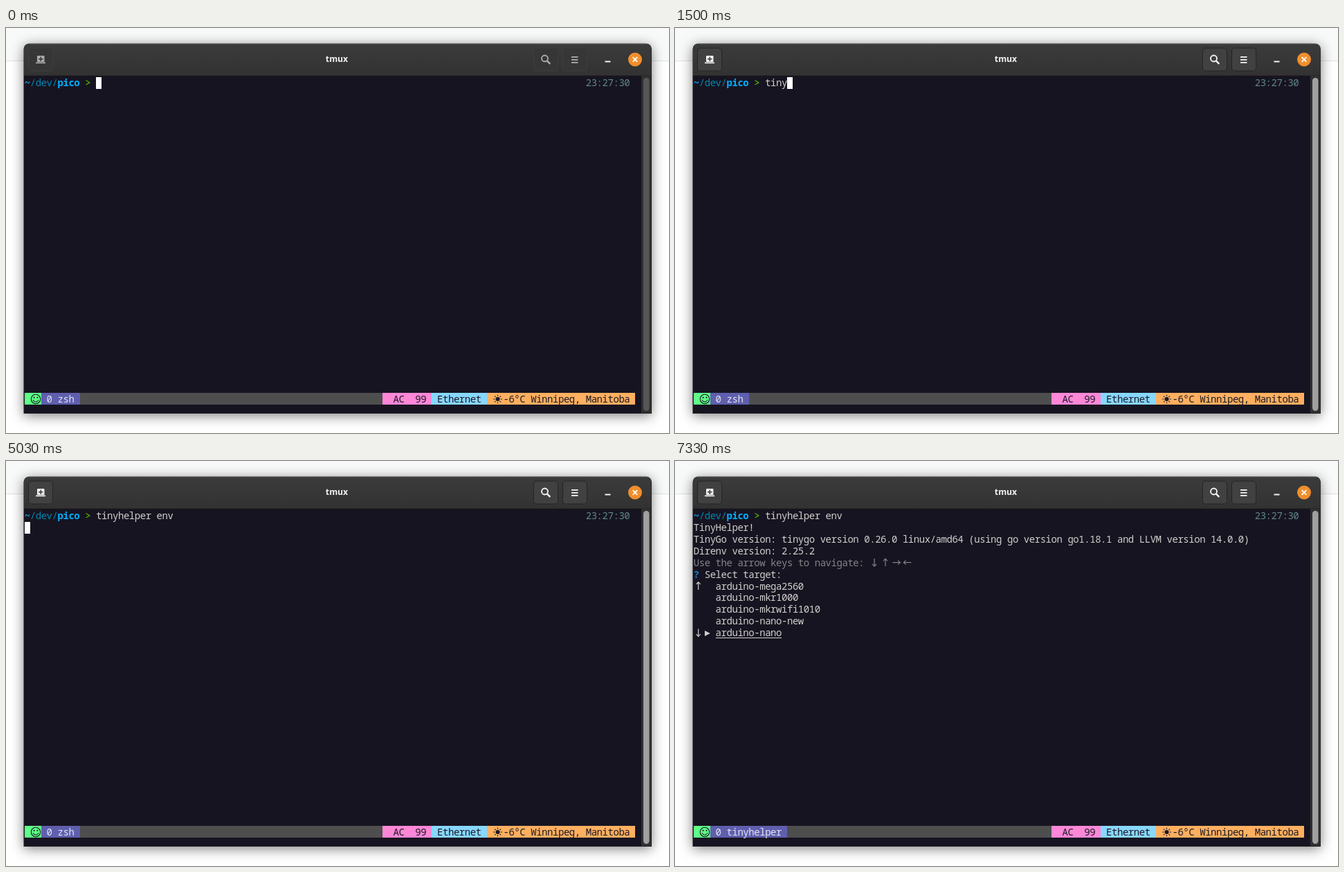
Animation, 958 px wide and 585 px high, one loop 8 s. Source, as an HTML page with a canvas:

```html
<!DOCTYPE html>
<html lang="en">
<head>
<meta charset="utf-8">
<title>Terminal</title>
<style>
  html, body { margin: 0; width: 100%; height: 100%; overflow: hidden; background: #fff; }
  canvas { display: block; width: 958px; height: 585px; }
</style>
</head>
<body>
<canvas id="stage" width="958" height="585"></canvas>
<script>
const ctx = document.getElementById('stage').getContext('2d');
const LOOP = 8000, CELL = 7.95, ROW = 16.9, LEFT = 27, TOP = 71;
const FG = '#d0cfcc', DARK = '#1c1926', DIM = '#858388';

const COMMAND = 'tinyhelper env';
// [time, characters typed], [time, selected item], times of the focus fade
const TYPING = [[0, 0], [1070, 1], [1170, 2], [1230, 3], [1500, 4], [1900, 5],
                [2300, 11], [2870, 12], [3870, 13], [4170, 14]];
const SELECTION = [[0, 0], [6170, 1], [6770, 2], [6970, 3], [7130, 4], [7330, 5]];
const FOCUS = [[0, 0], [30, 1 / 3], [100, 2 / 3], [170, 1]];
const ENTER = 5030, OUTPUT = 5070, MENU = 5100;
const TARGETS = ['mega1280', 'mega2560', 'mkr1000', 'mkrwifi1010', 'nano-new', 'nano']
  .map(name => 'arduino-' + name);

const stepAt = (steps, t) => steps.filter(s => s[0] <= t).pop()[1];
const colX = col => LEFT + col * CELL;
const rowY = row => TOP + row * ROW;

function rect(x, y, w, h, color) {
  ctx.fillStyle = color;
  ctx.fillRect(x, y, w, h);
}

function round(x, y, w, h, r, color) {
  ctx.fillStyle = color;
  ctx.beginPath();
  ctx.roundRect(x, y, w, h, r);
  ctx.fill();
}

function line(points, color, width) {
  ctx.strokeStyle = color;
  ctx.lineWidth = width;
  ctx.beginPath();
  points.forEach(([x, y], i) => i ? ctx.lineTo(x, y) : ctx.moveTo(x, y));
  ctx.stroke();
}

function circle(x, y, r, color, strokeWidth) {
  ctx.beginPath();
  ctx.arc(x, y, r, 0, 2 * Math.PI);
  ctx.fillStyle = ctx.strokeStyle = color;
  ctx.lineWidth = strokeWidth || 1;
  strokeWidth ? ctx.stroke() : ctx.fill();
}

// Text sits on the terminal's character grid
function print(col, row, text, color = FG, weight = 400) {
  ctx.font = `${weight} 14px "Noto Sans Mono", "DejaVu Sans Mono", monospace`;
  ctx.fillStyle = color;
  ctx.textAlign = 'center';
  [...text].forEach((ch, i) => ctx.fillText(ch, colX(col + i + 0.5), Math.round(rowY(row) + 13.2)));
}

function cells(col, count, row, color) {
  const x = Math.round(colX(col)), y = Math.round(rowY(row));
  rect(x, y, Math.round(colX(col + count)) - x, 17, color);
}

function arrow(col, row, quarterTurns, color) {
  ctx.save();
  ctx.translate(colX(col) + 6.7, rowY(row) + 8);
  ctx.rotate(quarterTurns * Math.PI / 2);
  line([[-5.5, 0], [5.5, 0]], color, 1.2);
  line([[2.2, -3], [5.4, 0], [2.2, 3]], color, 1.2);
  ctx.restore();
}

function drawBackdrop() {
  rect(0, 0, 958, 585, '#fff');
  rect(0, 0, 958, 47, '#f8f9f9');
  rect(0, 47, 958, 1, '#dfe0e1');
  ctx.save();
  ctx.shadowColor = 'rgba(0,0,0,.5)';
  ctx.shadowBlur = 18;
  ctx.shadowOffsetY = 3;
  round(25.5, 22.5, 907.5, 534.5, [8, 8, 0, 0], '#242328');
  ctx.restore();
}

function drawButton(x, focus) {
  const mix = (a, b) => Math.round(a + (b - a) * focus);
  const border = mix(62, 37), fill = mix(54, 65);
  round(x, 28.5, 36, 34, 5, `rgb(${border},${border},${border})`);
  round(x + 1, 29.5, 34, 32, 4, `rgb(${fill},${fill},${fill})`);
}

function drawHeader(focus) {
  const fill = ctx.createLinearGradient(0, 23, 0, 69);
  fill.addColorStop(0, '#3b3b3b');
  fill.addColorStop(1, '#323232');
  round(26, 23, 906.5, 46, [7, 7, 0, 0], fill);
  rect(33, 23, 893, 1, '#484848');
  rect(26, 68, 906.5, 1, '#292929');
  [32, 762, 804].forEach(x => drawButton(x, focus));

  const level = Math.round(172 + 70 * focus), icon = `rgb(${level},${level},${level})`;
  const face = focus > 0.5 ? '#414141' : '#363636';
  round(45, 40, 10.5, 9, 1, icon);
  rect(43, 49.5, 14, 1.7, icon);
  rect(47, 44, 6.5, 1.6, face);
  rect(49.5, 41.6, 1.6, 6.4, face);
  circle(778.5, 44, 4.5, icon, 1.9);
  line([[781.8, 47.3], [786.3, 51.8]], icon, 2.4);
  [41, 45, 49].forEach(y => rect(817, y, 9.5, 1.8, icon));

  rect(865.5, 47.5, 8, 2, '#f2f2f2');
  circle(909, 45.5, 10, '#f18e2e');
  line([[905.7, 42.2], [912.3, 48.8]], '#fff', 1.9);
  line([[912.3, 42.2], [905.7, 48.8]], '#fff', 1.9);

  ctx.font = '700 12.2px "Open Sans", "Noto Sans", sans-serif';
  ctx.textAlign = 'center';
  ctx.fillStyle = '#f4f4f4';
  ctx.fillText('tmux', 478, 49);
}

function drawScrollbar(focus) {
  const level = Math.round(86 + 74 * focus);
  rect(918, 69, 14, 487, '#303030');
  round(921, 72, 8.5, 481, 4.2, `rgb(${level},${level},${level})`);
}

function drawStatus(program) {
  const row = 27, y = rowY(row) + 8.7;
  cells(0, 111, row, '#4e4e4e');
  cells(0, 3, row, '#5fff87');
  cells(3, program.length + 4, row, '#5f5faf');
  cells(65, 9, row, '#ff87d7');
  cells(74, 10, row, '#87d7ff');
  cells(84, 27, row, '#ffaf5f');
  print(4, row, '0 ' + program, '#e4e4ee');
  print(67, row, 'AC  99', DARK);
  print(75, row, 'Ethernet', DARK);
  print(87, row, '-6°C Winnipeg, Manitoba', DARK);

  circle(43, y, 6.7, DARK, 1.1);
  circle(40.6, y - 2.2, 1.1, DARK);
  circle(45.4, y - 2.2, 1.1, DARK);
  ctx.lineWidth = 1.1;
  ctx.beginPath();
  ctx.arc(43, y, 4, 0.3, Math.PI - 0.3);
  ctx.stroke();

  circle(710.5, y, 3, DARK);
  for (let a = 0; a < 8; a++) {
    const dx = Math.cos(a * Math.PI / 4), dy = Math.sin(a * Math.PI / 4);
    line([[710.5 + 4.2 * dx, y + 4.2 * dy], [710.5 + 6.3 * dx, y + 6.3 * dy]], DARK, 1.1);
  }
}

function drawMenu(selected) {
  print(0, 4, 'Use the arrow keys to navigate:', DIM);
  [1, 3, 0, 2].forEach((turn, i) => arrow(32 + 2 * i, 4, turn, DIM));
  print(0, 5, '?', '#1680d0', 700);
  print(2, 5, 'Select target:');

  const first = Math.max(0, selected - 4);
  TARGETS.slice(first, first + 5).forEach((name, i) => {
    const row = 6 + i, y = rowY(row);
    print(4, row, name);
    if (first + i !== selected) return;
    rect(colX(4), Math.round(y + 15), name.length * CELL, 1, FG);
    ctx.beginPath();
    ctx.moveTo(43, y + 5);
    ctx.lineTo(50.8, y + 9);
    ctx.lineTo(43, y + 13);
    ctx.fill();
  });
  if (first > 0) arrow(0, 6, 3, FG);
  arrow(0, 10, 1, FG);
}

function drawTerminal(t) {
  rect(26, 69, 892, 487, '#171421');
  print(0, 0, '~', '#00afff', 700);
  print(1, 0, '/dev/', '#0087af');
  print(6, 0, 'pico', '#00afff', 700);
  print(11, 0, '>', '#5fd700');
  print(102, 0, '23:27:30', '#5f8787');

  const typed = stepAt(TYPING, t);
  if (t < ENTER) cells(13 + typed, 1, 0, '#fff');
  else if (t < OUTPUT) cells(0, 1, 1, '#fff');
  print(13, 0, COMMAND.slice(0, typed));

  if (t >= OUTPUT) {
    print(0, 1, 'TinyHelper!');
    print(0, 2, 'TinyGo version: tinygo version 0.26.0 linux/amd64 (using go version go1.18.1 and LLVM version 14.0.0)');
    print(0, 3, 'Direnv version: 2.25.2');
  }
  if (t >= MENU) drawMenu(stepAt(SELECTION, t));
  drawStatus(t < OUTPUT ? 'zsh' : 'tinyhelper');
}

function draw(now) {
  const t = now % LOOP, focus = stepAt(FOCUS, t);
  drawBackdrop();
  drawHeader(focus);
  drawTerminal(t);
  drawScrollbar(focus);
}

const start = performance.now();
function tick() {
  draw(performance.now() - start);
  requestAnimationFrame(tick);
}
tick();
</script>
</body>
</html>
```
